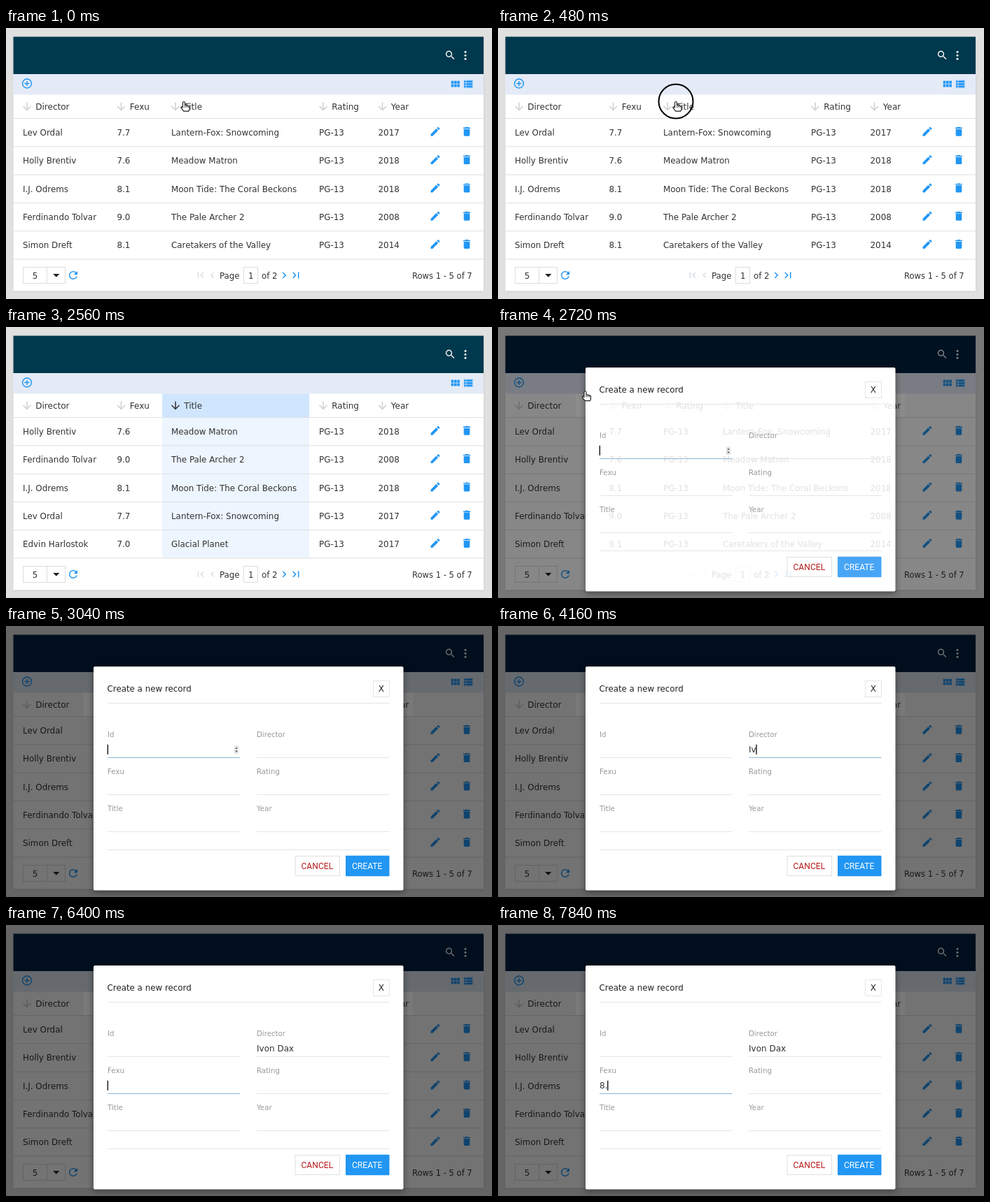
An HTML page with a canvas that plays this animation: 694 px wide and 388 px high, repeating every 8000 ms.

```html
<!DOCTYPE html>
<html lang="en">
<head>
<meta charset="utf-8">
<title>Movie table</title>
<style>
html, body { margin: 0; width: 100%; height: 100%; overflow: hidden; background: #e0e0e0; }
canvas { display: block; width: 694px; height: 388px; }
</style>
</head>
<body>
<canvas id="stage"></canvas>
<script>
const W = 694, H = 388, LOOP = 8000, STEP = 160;
const canvas = document.getElementById('stage');
const ctx = canvas.getContext('2d');
const dpr = window.devicePixelRatio || 1;
canvas.width = W * dpr;
canvas.height = H * dpr;

const BLUE = '#2196f3', INK = '#333', LINE = '#e0e0e0', SOFT = '#e5e5e5';
const SANS = '"DejaVu Sans", Verdana, sans-serif';
const ROBOTO = 'Roboto, Arial, sans-serif';

// 24-unit icons
const ICONS = {
  edit: 'M3 17.25V21h3.75L17.81 9.94l-3.75-3.75zM20.71 7.04a1 1 0 0 0 0-1.41l-2.34-2.34a1 1 0 0 0-1.41 0l-1.83 1.83 3.75 3.75z',
  bin: 'M6 19c0 1.1.9 2 2 2h8c1.1 0 2-.9 2-2V7H6zM19 4h-3.5l-1-1h-5l-1 1H5v2h14z',
  reload: 'M17.65 6.35A7.96 7.96 0 0 0 12 4a8 8 0 1 0 7.73 10h-2.08A6 6 0 1 1 12 6c1.66 0 3.14.69 4.22 1.78L13 11h7V4z',
  search: 'M15.5 14h-.79l-.28-.27A6.47 6.47 0 0 0 16 9.5 6.5 6.5 0 1 0 9.5 16c1.61 0 3.09-.59 4.23-1.57l.27.28v.79l5 4.99L20.49 19zm-6 0C7.01 14 5 11.99 5 9.5S7.01 5 9.5 5 14 7.01 14 9.5 11.99 14 9.5 14z',
  down: 'M20 12l-1.41-1.41L13 16.17V4h-2v12.17l-5.58-5.59L4 12l8 8z',
  up: 'M4 12l1.41 1.41L11 7.83V20h2V7.83l5.58 5.59L20 12l-8-8z',
  first: 'M18.41 16.59L13.82 12l4.59-4.59L17 6l-6 6 6 6zM6 6h2v12H6z',
  prev: 'M15.41 7.41L14 6l-6 6 6 6 1.41-1.41L10.83 12z',
  next: 'M10 6L8.59 7.41 13.17 12l-4.58 4.59L10 18l6-6z',
  last: 'M5.59 7.41L10.18 12l-4.59 4.59L7 18l6-6-6-6zM16 6h2v12h-2z',
  add: 'M13 7h-2v4H7v2h4v4h2v-4h4v-2h-4zM12 2a10 10 0 1 0 0 20 10 10 0 0 0 0-20zm0 18a8 8 0 1 1 0-16 8 8 0 0 1 0 16z'
};
for (const k in ICONS) ICONS[k] = new Path2D(ICONS[k]);
const HAND = new Path2D('M-1.5 1.2Q-1.5 0 0 0T1.5 1.2V5.2Q2.8 4.4 3.9 5.5Q5.2 4.9 6.1 6.1Q8 5.8 8 7.6V10.2Q8 12 6.8 13.6H-.2Q-1.6 12-3.8 9.2Q-4.6 7.6-3.2 7.4Q-2.3 7.4-1.5 8.4Z');

const MOVIES = {
  lantern: ['Lev Ordal', '7.7', 'Lantern-Fox: Snowcoming', '2017'],
  meadow: ['Holly Brentiv', '7.6', 'Meadow Matron', '2018'],
  moon: ['I.J. Odrems', '8.1', 'Moon Tide: The Coral Beckons', '2018'],
  archer: ['Ferdinando Tolvar', '9.0', 'The Pale Archer 2', '2008'],
  valley: ['Simon Dreft', '8.1', 'Caretakers of the Valley', '2014'],
  dax: ['Ivon Dax', '8.1', "Why Dax's In", '1991'],
  planet: ['Edvin Harlostok', '7.0', 'Glacial Planet', '2017']
};
const ORDER = {
  none: ['lantern', 'meadow', 'moon', 'archer', 'valley'],
  up: ['valley', 'dax', 'planet', 'lantern', 'moon'],
  down: ['meadow', 'archer', 'moon', 'lantern', 'planet']
};
const COLS = { Director: 24, Fexu: 158.5, Title: 236, Rating: 447, Year: 531.5 };
const MOVED = { Director: 24, Fexu: 158.5, Rating: 236, Title: 321, Year: 531.5 };
const cell = (m, col) => col === 'Rating' ? 'PG-13' : m[['Director', 'Fexu', 'Title', 'Year'].indexOf(col)];
const rowY = i => 149.7 + 40.3 * i;

function text(s, x, y, size = 11.9, color = INK, family = SANS) {
  ctx.font = `${size}px ${family}`;
  ctx.fillStyle = color;
  ctx.fillText(s, x, y);
}
function box(x, y, w, h, color) {
  ctx.fillStyle = color;
  ctx.fillRect(x, y, w, h);
}
function pill(x, y, w, h, r, color) {
  ctx.fillStyle = color;
  ctx.beginPath();
  ctx.roundRect(x, y, w, h, r);
  ctx.fill();
}
function frame(x, y, w, h, color = '#ddd') {
  ctx.strokeStyle = color;
  ctx.lineWidth = 1;
  ctx.strokeRect(x + .5, y + .5, w - 1, h - 1);
}
function icon(name, cx, cy, color = BLUE, k = .72) {
  ctx.save();
  ctx.translate(cx, cy);
  ctx.scale(k, k);
  ctx.translate(-12, -12);
  ctx.fillStyle = color;
  ctx.fill(ICONS[name], 'evenodd');
  ctx.restore();
}
function dot(x, y, r, color) {
  ctx.fillStyle = color;
  ctx.beginPath();
  ctx.arc(x, y, r, 0, 7);
  ctx.fill();
}
function triangle(x, y, w, h, color) {
  ctx.fillStyle = color;
  ctx.beginPath();
  ctx.moveTo(x - w, y);
  ctx.lineTo(x + w, y);
  ctx.lineTo(x, y + h);
  ctx.fill();
}

function chrome(bar) {
  box(0, 0, W, H, LINE);
  ctx.save();
  ctx.shadowColor = 'rgba(0,0,0,.18)';
  ctx.shadowBlur = 3 * dpr;
  box(10.5, 12.5, 671.5, 364, '#fff');
  ctx.restore();
  box(10.5, 12.5, 671.5, 53.5, bar);
  box(10.5, 66, 671.5, 29.5, '#e4ebf7');
  icon('search', 634.3, 39, '#f4f4f4');
  for (const y of [34.2, 39.2, 44.2]) dot(656, y, 1.5, '#f4f4f4');
  icon('add', 30, 79.5);
  box(652.5, 73, 15.5, 14, '#d4e6fa');
  for (let r = 0; r < 2; r++)
    for (let c = 0; c < 3; c++) box(635.7 + c * 4.3, 75.7 + r * 4.8, 3.6, 4, BLUE);
  for (let r = 0; r < 3; r++) {
    box(654, 75.3 + r * 3.6, 2.6, 2.8, BLUE);
    box(657.4, 75.3 + r * 3.6, 8.8, 2.8, BLUE);
  }
}

function cells(cols, sort) {
  for (const col in cols) {
    const x = cols[col], on = col === 'Title' && sort !== 'none';
    icon(on ? sort : 'down', x + 6, 112.5, on ? INK : '#cfcfcf', .75);
    text(col, x + 18.3, 117, 12);
    ORDER[sort].forEach((id, i) => text(cell(MOVIES[id], col), x, rowY(i) + 4.4));
  }
}

function pager() {
  icon('first', 278, 354, '#d6dde4', .72);
  icon('prev', 294.8, 354, '#d6dde4', .68);
  text('Page', 305, 359, 11.8);
  frame(339, 342, 21, 24);
  text('1', 346, 359, 11.8);
  text('of 2', 365, 359, 11.8);
  icon('next', 397.3, 354, BLUE, .74);
  icon('last', 414, 354, BLUE, .74);
}

function table(cols, sort) {
  if (sort !== 'none') {
    box(223, 95.5, 210, 34, '#d0e6ff');
    box(223, 129.5, 210, 201, '#edf5ff');
  }
  for (let i = 0; i < 6; i++) box(10.5, 129 + 40.3 * i, 671.5, 1, LINE);
  cells(cols, sort);
  for (let i = 0; i < 5; i++) {
    icon('edit', 613, rowY(i) - 1.4);
    icon('bin', 658, rowY(i) - 1.4);
  }
  frame(24, 342, 61, 24);
  box(58, 342, 1, 24, '#ddd');
  text('5', 37.8, 359);
  triangle(71.8, 352, 4.6, 4.8, '#222');
  icon('reload', 96, 354, BLUE, .75);
  pager();
  text('Rows 1 - 5 of 7', 580, 359, 11.55);
}

function field(label, x, y, f) {
  text(label, x, y, 10.2, '#999');
  const active = f.focus === label, value = f[label] || '';
  box(x, y + 28.7, 189.5, 1, active ? '#8fb6d6' : SOFT);
  text(value, x, y + 22, 12, INK);
  if (active && f.caret) {
    ctx.font = '12px ' + SANS;
    box(x + ctx.measureText(value).width - .3, y + 10.5, 1.3, 14, '#000');
  }
}

function dialog(f, fading) {
  ctx.save();
  ctx.shadowColor = 'rgba(0,0,0,.45)';
  ctx.shadowBlur = 10 * dpr;
  ctx.shadowOffsetY = 2 * dpr;
  pill(125, 58, 442.5, 320.5, 2, '#fff');
  ctx.restore();
  if (fading) {
    ctx.save();
    ctx.beginPath();
    ctx.rect(125, 58, 442.5, 320.5);
    ctx.clip();
    ctx.globalAlpha = .15;
    cells(MOVED, 'none');
    pager();
    ctx.restore();
  }
  text('Create a new record', 144.5, 94.2, 11.85, '#222');
  frame(524, 78, 24, 24, SOFT);
  text('X', 531.8, 94.3, 12, '#222');
  box(145, 110, 402.5, 1, SOFT);
  [['Id', 'Director'], ['Fexu', 'Rating'], ['Title', 'Year']].forEach((pair, i) => {
    field(pair[0], 145, 159.3 + 53 * i, f);
    field(pair[1], 358, 159.3 + 53 * i, f);
  });
  if (f.focus === 'Id') {
    pill(325.5, 171, 7, 12.5, 2.5, '#e8e8e8');
    triangle(329, 175.8, 1.8, -2.4, '#555');
    triangle(329, 178.6, 1.8, 2.4, '#555');
  }
  box(145, 320, 402.5, 1, SOFT);
  frame(412.5, 329, 64.5, 29, LINE);
  text('CANCEL', 421.5, 348, 12.1, '#b71c1c', ROBOTO);
  pill(485, 328.7, 62.5, 29.5, 1, fading ? '#48a5f5' : BLUE);
  text('CREATE', 494, 348, 12.1, '#fff', ROBOTO);
}

function hand(x, y) {
  ctx.save();
  ctx.translate(x, y);
  ctx.lineJoin = 'round';
  ctx.lineWidth = 1.2;
  ctx.fillStyle = '#fff';
  ctx.strokeStyle = '#222';
  ctx.fill(HAND);
  ctx.stroke(HAND);
  ctx.beginPath();
  for (const fx of [1.5, 3.8, 6]) {
    ctx.moveTo(fx, 5.8);
    ctx.lineTo(fx, 8.6);
  }
  ctx.lineWidth = .8;
  ctx.stroke();
  ctx.restore();
}

function ripple(age) {
  if (age < 0 || age >= 320) return;
  ctx.strokeStyle = '#000';
  ctx.lineWidth = 2;
  ctx.beginPath();
  ctx.arc(254, 105, 10 + 14.5 * Math.min(1, age / 160), 0, 7);
  ctx.stroke();
}

const typed = (s, t, start, gap) => t < start ? '' : s.slice(0, 1 + Math.floor((t - start) / gap));

function form(t) {
  const blinkOff = t >= 6880 && t < 7360 || t >= 3200 && t < 3520;
  return {
    focus: t < 3520 ? 'Id' : t < 6400 ? 'Director' : 'Fexu',
    Director: typed('Ivon Dax', t, 3840, 290),
    Fexu: typed('8.', t, 7360, 320),
    caret: !blinkOff
  };
}

function draw(t) {
  ctx.setTransform(dpr, 0, 0, dpr, 0, 0);
  if (t < 2720) {
    chrome('#00384d');
    table(COLS, t < 640 ? 'none' : t < 1600 ? 'up' : 'down');
    ripple(t - 320);
    ripple(t - 1280);
    if (t < 2400) hand(254, 105.5);
    return;
  }
  const fading = t < 2880;
  chrome('#002040');
  table(MOVED, 'none');
  box(0, 0, W, H, `rgba(0,0,0,${fading ? .47 : .55})`);
  box(111, 96, 470, 33, 'rgba(255,255,255,.04)');
  dialog(form(t), fading);
  if (fading) hand(124.5, 92);
}

const start = performance.now();
function tick() {
  const t = (performance.now() - start) % LOOP;
  draw(Math.floor(t / STEP) * STEP);
  requestAnimationFrame(tick);
}
tick();
</script>
</body>
</html>
```
